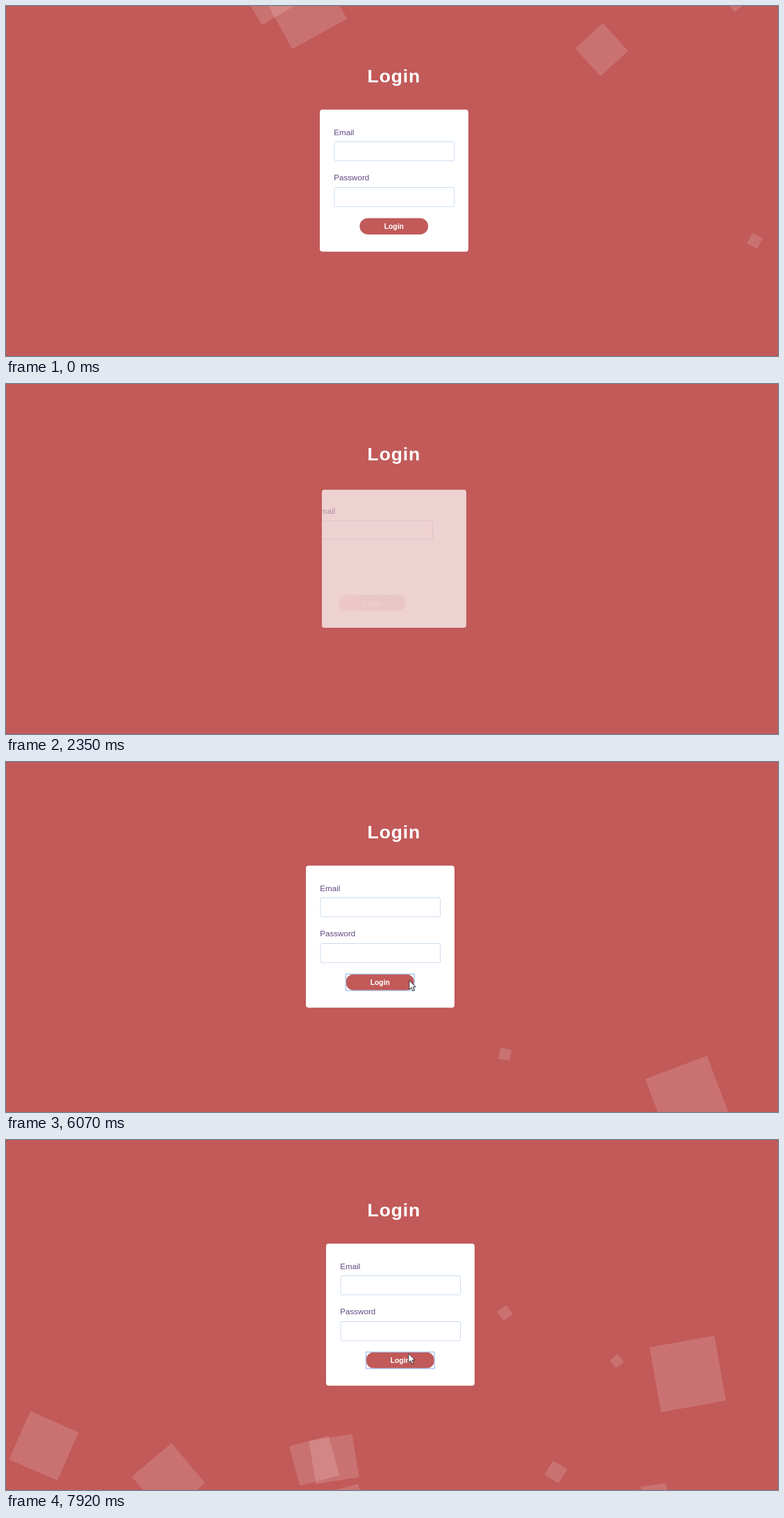
Write an HTML page that moves like this. It is 1112 px wide and 504 px high and loops after 8 s.

```html
<!DOCTYPE html>
<html lang="en">
<head>
<meta charset="utf-8">
<title>Login</title>
<style>
  html, body { margin: 0; width: 100%; height: 100%; overflow: hidden; background: #c15a59; }
  svg { display: block; width: 1112px; height: 504px; font-family: "Liberation Sans", Arial, sans-serif; }
  .square { fill: #fff; fill-opacity: .145; }
  .title { font-size: 26.5px; font-weight: bold; letter-spacing: .9px; fill: #fff; }
  .label { font-size: 11.6px; fill: #5f4780; }
  .input { fill: #fff; stroke: #cddcec; }
  .button { fill: #c15a59; }
  .caption { font-size: 10.4px; font-weight: bold; fill: #fff; }
  .ring { fill: none; stroke: #a3c2f2; stroke-width: 1.3; }
</style>
</head>
<body>
<svg viewBox="0 0 1112 504">
  <defs>
    <clipPath id="card"><rect x="452" y="149.3" width="214" height="204.5" rx="4"/></clipPath>
  </defs>
  <rect width="1112" height="504" fill="#c15a59"/>
  <g id="squares"></g>
  <text class="title" x="520.6" y="110">Login</text>
  <g id="form" clip-path="url(#card)">
    <rect x="452" y="149" width="214" height="205" fill="#fff"/>
    <g id="email">
      <text class="label" x="472.3" y="185.5">Email</text>
      <rect class="input" x="473" y="195.5" width="172.6" height="27.4" rx="1.5"/>
    </g>
    <g id="password">
      <text class="label" x="472.3" y="251">Password</text>
      <rect class="input" x="473" y="261.5" width="172.6" height="27.4" rx="1.5"/>
    </g>
    <g id="login">
      <rect class="button" x="509.5" y="305.4" width="98.6" height="23.6" rx="11.8"/>
      <text class="caption" x="558.8" y="321" text-anchor="middle">Login</text>
      <rect id="ring" class="ring" x="509.5" y="305.3" width="98.6" height="23.8"/>
    </g>
  </g>
  <path id="cursor" d="M.5 .5V13.6L3.5 10.8L5.7 15.6L7.9 14.6L5.8 9.9H9.9Z" fill="#fff" stroke="#222" stroke-width=".9"/>
</svg>
<script>
const LOOP = 8000;
const RELOAD = 2133;
const CLICKS = [4432, 5221, 6019, 6847, 7806];
const TURN = 1.293;  // degrees per pixel of travel
const START = 560;   // top edge of a square before it sets off

const $ = id => document.getElementById(id);
const clamp = x => Math.min(1, Math.max(0, x));
const mix = (a, b, p) => a + (b - a) * p;
const move = (el, x, y, rest = "") => el.setAttribute("transform", `translate(${x} ${y}) ${rest}`);
const show = (el, on) => el.setAttribute("visibility", on ? "visible" : "hidden");

// CSS "ease": cubic-bezier(.25, .1, .25, 1)
function ease(x) {
  const bez = (s, a, b) => 3 * s * (1 - s) * (1 - s) * a + 3 * s * s * (1 - s) * b + s * s * s;
  let lo = 0, hi = 1;
  for (let i = 0; i < 24; i++) {
    const mid = (lo + hi) / 2;
    if (bez(mid, .25, .25) < x) lo = mid; else hi = mid;
  }
  return bez(lo, .1, 1);
}

// Linear path through key points [time, x, y].
function along(points, t) {
  const i = points.findIndex(p => p[0] > t);
  if (i < 1) return points.at(i).slice(1);
  const [a, b] = [points[i - 1], points[i]];
  const p = (t - a[0]) / (b[0] - a[0]);
  return [mix(a[1], b[1], p), mix(a[2], b[2], p)];
}

// The picture advances in steps, like a screen recording.
function stepped(t) {
  const [base, len] = t < 795 ? [0, 72.7] : [800, 77.4];
  return base + Math.floor((t - base) / len + .15) * len;
}

// A square at height y at the given time; its turn follows from its travel.
const squares = [];
function square(at, x, size, y, speed) {
  const el = document.createElementNS("http://www.w3.org/2000/svg", "rect");
  el.setAttribute("class", "square");
  for (const k of ["x", "y"]) el.setAttribute(k, -size / 2);
  for (const k of ["width", "height"]) el.setAttribute(k, size);
  $("squares").append(el);
  squares.push(t => {
    const now = y - speed * (t - at) / 1000;
    move(el, x, now, `rotate(${TURN * (START + size / 2 - now)})`);
    show(el, (t < RELOAD) === (at < RELOAD));
  });
}
const rise = (at, x, size, y, speed = 75) => square(at, x, size, y, speed);
const fall = (at, x, size, y) => square(at, x, size, y, -12 - 1400 / size);

// Before the reload some squares are on their way back down.
fall(825, 379, 59, 16.5);
fall(825, 1053, 39, 21);
fall(825, 1078.5, 17, 416);
fall(825, 594.5, 30, -21);
fall(825, 688, 24, -69);
rise(825, 430, 90, -61);
rise(825, 858, 54, 1);
rise(825, 216.5, 69, 540);

// After it all start again from below.
rise(7920, 982, 95, 337, 79.3);
rise(7920, 718.7, 16.5, 249, 92.6);
rise(7920, 879.7, 14.5, 318.5, 118.5);
rise(7920, 54.5, 76, 440.5, 88.6);
rise(7920, 234, 75, 489.5, 61);
rise(7920, 444, 59, 462, 57);
rise(7920, 472.5, 63, 459.5, 66);
rise(7920, 486, 60, 532);
rise(7920, 792, 24, 478);
rise(7920, 935, 37, 515);

const pointer = [
  [2575, 175, 3], [3340, 538, 198], [4051, 545, 193],
  [4230, 580.3, 314], [7250, 580.3, 314], [7900, 579.3, 307]
];

// Two 200 ms swings: left at 35 %, right at 70 %, back to the middle.
function shake(t) {
  const start = CLICKS.find(c => t >= c && t < c + 400);
  if (start === undefined) return 0;
  const p = (t - start) % 200 / 200;
  const swing = p < .35 ? -p / .35 : p < .7 ? (p - .525) / .175 : (1 - p) / .3;
  return Math.round(32.1 * swing);
}

function slideIn(id, width, age, delay) {
  const p = age < 0 ? 1 : ease(clamp((age - delay) / 500));
  move($(id), -.35 * width * (1 - p), 0);
  $(id).setAttribute("opacity", p);
}

function draw(time) {
  const t = stepped(time), age = t - RELOAD;
  squares.forEach(f => f(t));

  const p = age < 0 ? 1 : ease(clamp(age / 500));
  $("form").setAttribute("opacity", p);
  move($("form"), 559 + shake(t), 251.5, `scale(${mix(.9, 1, p)}) translate(-559 -251.5)`);
  slideIn("email", 173, age, 65);
  slideIn("login", 98.6, age, 172);
  slideIn("password", 173, age, 240);
  show($("ring"), t >= CLICKS[0]);

  move($("cursor"), ...along(pointer, t));
  show($("cursor"), t >= pointer[0][0]);
}

const begin = performance.now();
function tick() {
  draw((performance.now() - begin) % LOOP);
  requestAnimationFrame(tick);
}
tick();
</script>
</body>
</html>
```
